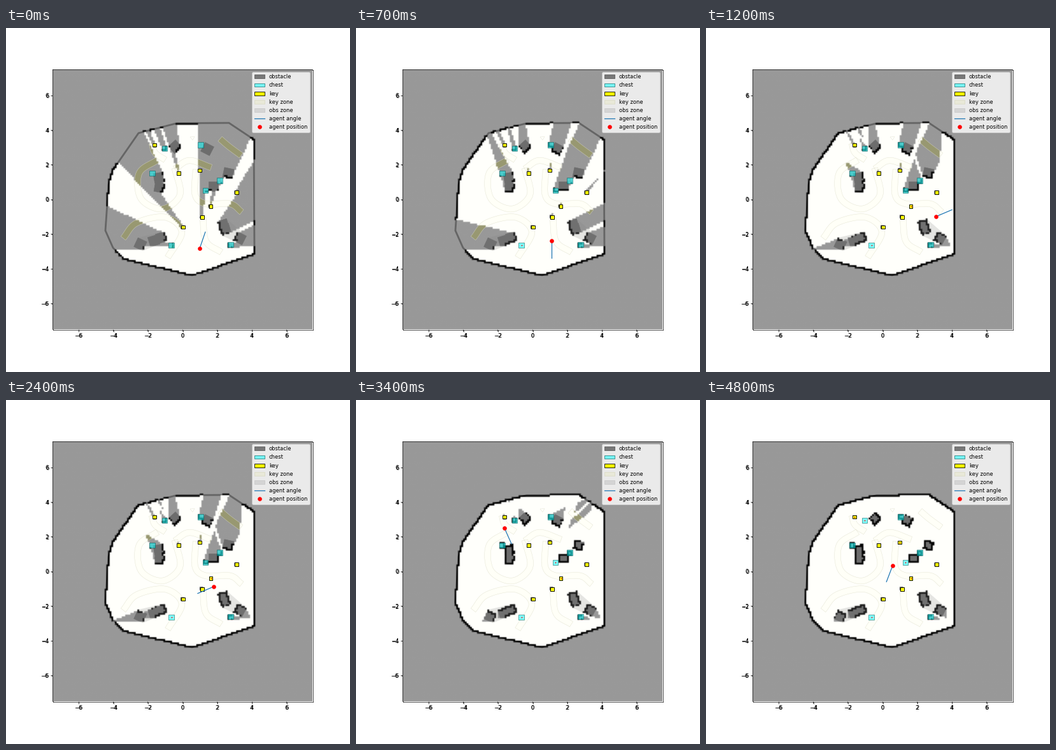
A matplotlib script that plays this animation: 540x540 px, repeating every 5.1 s.

```python
import numpy as np
import matplotlib.pyplot as plt
from matplotlib.animation import FuncAnimation
from matplotlib.lines import Line2D
from matplotlib.patches import Patch, Polygon
from matplotlib.path import Path

SIZE, DPI = 540, 60
SCALE, CX, CY = 27.2, 276.8, 268.8  # pixels per unit, position of the origin
LIM, N = 7.5, 150
CELL = 2 * LIM / N
FREE, WALL = 1, 2
REACH = 0.4

ROOM = [(208, 165), (268, 149.5), (350, 149), (389, 175), (390, 354), (292, 388),
        (185, 362), (168, 345), (156, 318), (161, 246), (167, 224)]
# equal squares: x, y, tilt; the long blocks are two squares each
BLOCKS = [(240, 235, 10), (241, 250, -10), (265.5, 186.5, 42), (316, 190, -27),
          (325.5, 248.5, 0), (349, 228, -12), (341, 309, 17), (344, 316, 17),
          (367, 330, -27), (232, 334, 17), (244, 329, 17), (211, 339.5, -25)]
CHESTS = [(305.5, 183.5), (249, 189), (229.5, 228), (335.5, 239.5),
          (313, 255), (259.5, 341), (352.5, 340)]
KEYS = [(233, 183.5), (271, 228), (304, 223.5), (362, 258),
        (321.5, 280), (308, 297), (278, 312.5)]
# key points on the centre lines of the key zones
BANDS = [
    [(238, 207), (209, 228), (212, 268), (245, 284), (273, 262), (265, 220)],
    [(265, 221), (288, 208), (322, 219)],
    [(298, 222), (297, 262), (314, 276), (352, 276), (370, 289)],
    [(309, 298), (314, 335), (338, 352)],
    [(184, 330), (205, 306), (250, 297), (276, 320), (254, 360)],
    [(336, 174), (350, 186), (369, 200)],
    [(229, 181), (234, 196), (250, 207)],
]

# steps of 100 ms: rests with a heading, and points passed facing the next one
RESTS = {0: (304, 346, 71), 7: (307, 334, -90), 12: (361, 296, 23),
         24: (326, 293, 203), 34: (233, 201, -66), 42: (225, 198, -21),
         48: (293, 260, 249)}
PASSED = {5: CHESTS[5], 9: (300, 288), 10: KEYS[4], 28: (225, 290), 30: (284, 187),
          31: CHESTS[4], 43: (241, 186), 44: (290, 175), 45: (372, 200), 47: KEYS[2]}
BETWEEN = {1, 3, 46}


def to_data(pts):
    p = np.asarray(pts, float)
    return np.stack([p[..., 0] - CX, CY - p[..., 1]], -1) / SCALE


def square(x, y, size, tilt=0):
    a = np.radians(tilt + 45 + 90 * np.arange(4))
    r = size / np.sqrt(2) / SCALE
    return to_data((x, y)) + r * np.stack([np.cos(a), np.sin(a)], -1)


def smooth(pts, n=12):
    """Catmull-Rom curve through the points."""
    p = np.asarray(pts, float)
    p = np.vstack([2 * p[0] - p[1], p, 2 * p[-1] - p[-2]])
    t = np.linspace(0, 1, n, endpoint=False)[:, None]
    out = [0.5 * (2 * b + (c - a) * t + (2 * a - 5 * b + 4 * c - d) * t**2
                  + (3 * b - a - 3 * c + d) * t**3)
           for a, b, c, d in zip(p, p[1:], p[2:], p[3:])]
    return np.vstack(out + [p[-2:-1]])


def band(pts, half=4.8):
    c = smooth(pts)
    d = np.gradient(c, axis=0)
    d /= np.linalg.norm(d, axis=1, keepdims=True)
    n = np.stack([-d[:, 1], d[:, 0]], -1) * half
    return to_data(np.vstack([c + n, (c - n)[::-1]]))


def hull(pts):
    pts = sorted(map(tuple, pts))
    out = []
    for run in (pts, pts[::-1]):
        side = []
        for x, y in run:
            while len(side) > 1:
                (ax_, ay), (bx, by) = side[-2:]
                if (bx - ax_) * (y - ay) - (by - ay) * (x - ax_) > 0:
                    break
                side.pop()
            side.append((x, y))
        out += side[:-1]
    return out


room = to_data(ROOM)
blocks = [square(x, y, 15.5, tilt) for x, y, tilt in BLOCKS]
chests = [square(x, y, 8.2) for x, y in CHESTS]
keys = [square(x, y, 5.6) for x, y in KEYS]
centres = to_data(CHESTS + KEYS)

mid = -LIM + CELL * (np.arange(N) + 0.5)
cells = np.stack(np.meshgrid(mid, mid), -1).reshape(-1, 2)


def inside(poly):
    return Path(poly).contains_points(cells).reshape(N, N)


solid = ~inside(room * 0.99)
for b in blocks:
    solid |= inside(b)
item_cells = [inside(p) for p in chests + keys]

angles = np.linspace(0, 2 * np.pi, 1500, endpoint=False)[:, None]
reach = np.arange(0, 11, 0.03)


def scan(grid, pos, blocked):
    cols = ((pos[0] + reach * np.cos(angles) + LIM) / CELL).astype(int).clip(0, N - 1)
    rows = ((pos[1] + reach * np.sin(angles) + LIM) / CELL).astype(int).clip(0, N - 1)
    stop = blocked[rows, cols].argmax(axis=1)
    seen = np.arange(len(reach)) < stop[:, None]
    grid[rows[seen], cols[seen]] = FREE
    ray = np.arange(len(angles))
    for depth in (0, 2):
        r, c = rows[ray, stop + depth], cols[ray, stop + depth]
        hit = blocked[r, c]
        grid[r[hit], c[hit]] = WALL


def route():
    known = {**RESTS, **PASSED}
    at = sorted(known)
    steps = sorted(BETWEEN.union(at))
    xy = to_data([[np.interp(s, at, [known[k][i] for k in at]) for i in (0, 1)]
                  for s in steps])
    turn = np.diff(xy, axis=0, append=xy[:1])
    heading = np.arctan2(turn[:, 1], turn[:, 0])
    for i, s in enumerate(steps):
        if s in RESTS:
            heading[i] = np.radians(RESTS[s][2])
    return steps, xy, xy + np.stack([np.cos(heading), np.sin(heading)], -1)


def explore(path):
    grid = np.zeros((N, N), int)
    taken = np.zeros(len(centres), bool)
    maps = []
    for pos in path:
        taken |= np.hypot(*(centres - pos).T) < REACH
        blocked = solid.copy()
        for cell, gone in zip(item_cells, taken):
            if not gone:
                blocked |= cell
        scan(grid, pos, blocked)
        maps.append((grid.copy(), taken.copy()))
    return maps


steps, path, tips = route()
maps = explore(path)
# unknown, free, wall
shades = np.array([(0.5, 0.5, 0.5, 0.8), (1, 1, 0.985, 0.985), (0, 0, 0, 0.87)])

fig = plt.figure(figsize=(SIZE / DPI, SIZE / DPI), dpi=DPI, facecolor="white")
side = 2 * LIM * SCALE / SIZE
left, bottom = CX / SIZE - side / 2, 1 - CY / SIZE - side / 2
# a second frame, slightly offset, gives the heavy labels and the lower right edge
under = fig.add_axes([left + 0.8 / SIZE, bottom - 0.8 / SIZE, side, side], label="under")
ax = fig.add_axes([left, bottom, side, side], label="map")
ax.spines[["right", "bottom"]].set_visible(False)
for axis in (under, ax):
    axis.set(xlim=(-LIM, LIM), ylim=(-LIM, LIM))
    axis.set_xticks(range(-6, 7, 2))
    axis.set_yticks(range(-6, 7, 2))


def add(poly, **style):
    return ax.add_patch(Polygon(poly, closed=True, **style))


faint = dict(fill=False, ec="#dcdcc8", lw=0.6, alpha=0.75, zorder=2.2)
add(room, fill=False, ec="black", lw=3.4, zorder=1)
for b in blocks:
    add(b, fc="#282828", ec="#282828", lw=0.8, zorder=1.2)
for b in map(band, BANDS):
    add(b, fc="#ffff3c", ec="none", zorder=1)
    add(b, **faint)
add(to_data([(289, 171), (296, 170.5), (293, 176)]), **faint)
for group in (blocks[6:9], blocks[9:]):
    add(hull(np.vstack(group)), fc="gray", ec="none", alpha=0.2, zorder=2.1)

image = ax.imshow(shades[maps[0][0]], extent=(-LIM, LIM, -LIM, LIM), origin="lower",
                  interpolation="hanning", aspect="auto", zorder=2)

for p in chests:
    add(p, fc=(0, 1, 1, 0.5), ec=(0, 0.35, 0.35, 0.8), lw=0.8, zorder=3)
for p in keys:
    add(p, fc="yellow", ec="black", lw=1.1, zorder=3)
dots = [ax.plot(*c, "o", color="red", ms=2.2, mew=0, zorder=3.2)[0] for c in centres]

line = dict(color="#1f77b4", lw=1.5)
disc = dict(color="red", marker="o", ms=6.4, mew=1.5, ls="none")
heading, = ax.plot([], [], zorder=4, **line)
agent, = ax.plot([], [], zorder=4.5, **disc)

ax.legend(handles=[
    Patch(fc="0.47", ec="0.36", label="obstacle"),
    Patch(fc="#76f5f5", ec="#2f8585", label="chest"),
    Patch(fc="yellow", ec="black", label="key"),
    Patch(fc="#e8e8d8", ec="#dcdcc8", label="key zone"),
    Patch(fc="#d4d4d4", ec="#cacaca", label="obs zone"),
    Line2D([], [], label="agent angle", **line),
    Line2D([], [], label="agent position", **disc),
], loc="upper right", fontsize=10)


def update(step):
    i = np.searchsorted(steps, step, side="right") - 1
    grid, taken = maps[i]
    image.set_data(shades[grid])
    for dot, on in zip(dots, taken):
        dot.set_visible(bool(on))
    heading.set_data(*np.stack([path[i], tips[i]], -1))
    agent.set_data(*path[i][:, None])
    return [image, heading, agent, *dots]


anim = FuncAnimation(fig, update, frames=51, interval=100, repeat=True,
                     repeat_delay=0, blit=False)
plt.show()
```
